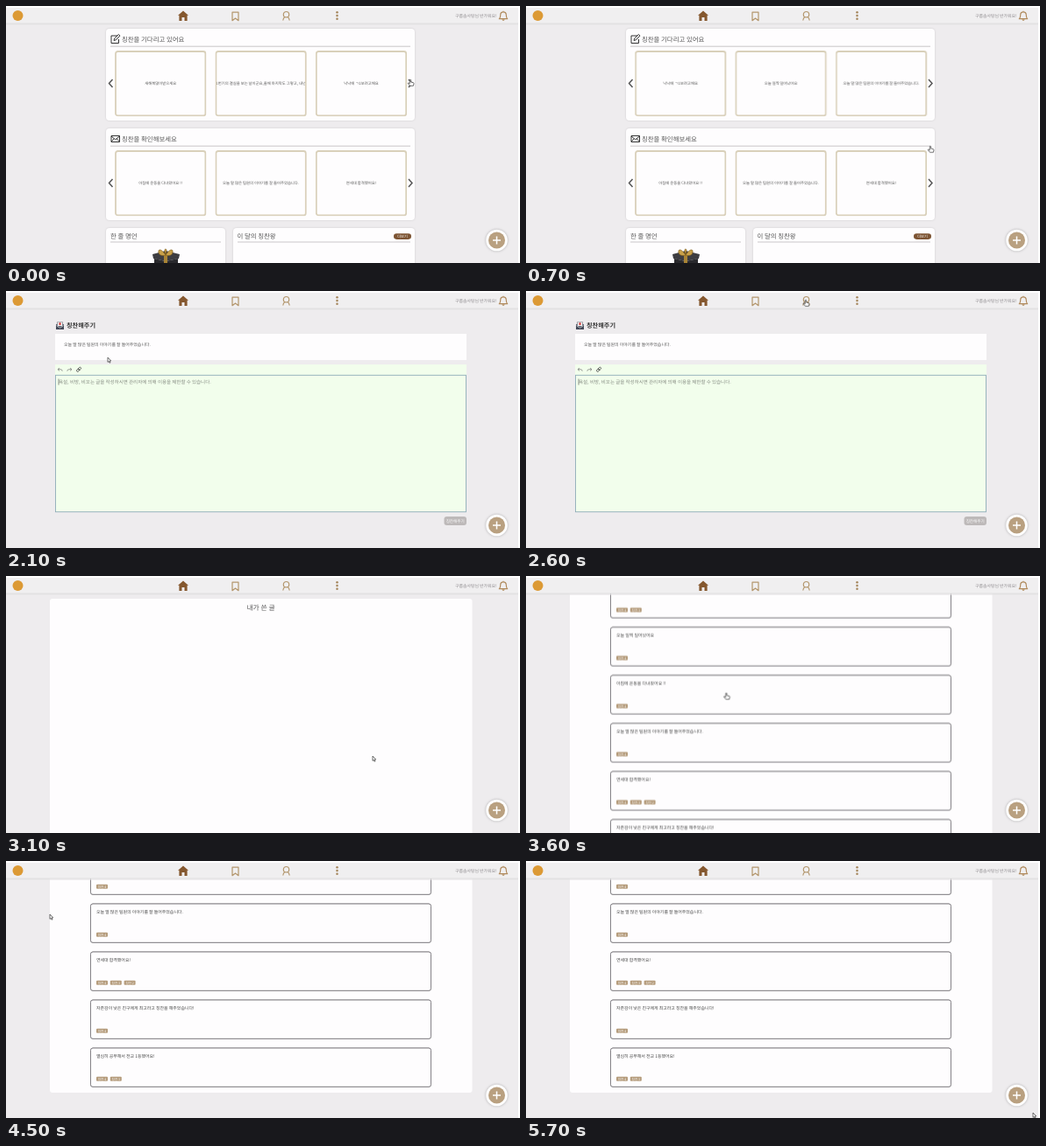
Animation of 586 by 294 pixels, one loop 5.8 s. Source, as an HTML page:

```html
<!DOCTYPE html>
<html>
<head>
<meta charset="utf-8">
<title>칭찬</title>
<style>
html, body { margin: 0; width: 100%; height: 100%; overflow: hidden; background: #fff; }
#stage { display: block; }
text { font-family: "Noto Sans CJK KR", "Noto Sans CJK", sans-serif; fill: #555; text-rendering: geometricPrecision; }
.panel { fill: #fefdfe; filter: drop-shadow(0 .5px 1px #0002); }
.line { stroke: #bbb8ba; stroke-width: .8; }
.tan { fill: none; stroke: #b3966c; stroke-width: 1.2; stroke-linejoin: round; }
.dark { fill: none; stroke: #333; stroke-width: 1; stroke-linejoin: round; }
.arrow { fill: none; stroke: #555; stroke-width: 1.5; }
.card { fill: none; stroke: #d9d0ba; stroke-width: 1.8; }
.post { fill: #fefdfe; stroke: #858287; stroke-width: 1; filter: drop-shadow(.4px .8px .7px #0006); }
.pointer { fill: #fff; stroke: #333; stroke-width: .7; stroke-linejoin: round; }

.scene, .shape, .hover, .track, #posts, #scroll, #cursor { animation: 5800ms linear infinite; }
.scene, .shape, .hover { animation-timing-function: step-end; }
#home { animation-name: home; }
#write { animation-name: write; }
#list { animation-name: list; }
#first { animation-name: first; }
#second { animation-name: second; }
.hover { animation-name: hover; }
#posts { animation-name: load; }
#scroll { animation-name: scroll; animation-timing-function: ease-in-out; }
#cursor { animation-name: move; animation-timing-function: ease-in-out; }
#hand { animation-name: hand; }
#tip { animation-name: tip; }

@keyframes home { 0% { opacity: 1 } 27.6%, 100% { opacity: 0 } }
@keyframes write { 0% { opacity: 0 } 27.6% { opacity: 1 } 48.2%, 100% { opacity: 0 } }
@keyframes list { 0% { opacity: 0 } 48.2%, 100% { opacity: 1 } }
@keyframes first {
  0%, 2.6% { transform: none }
  6%, 7.8% { transform: translateX(-114.4px) }
  11.2%, 100% { transform: translateX(-228.8px) }
}
@keyframes second {
  0%, 14% { transform: none }
  16.6%, 17.4% { transform: translateX(-114.4px) }
  20.5%, 100% { transform: translateX(-228.8px) }
}
@keyframes hover { 0% { stroke: #d9d0ba } 21% { stroke: #a58d6e } 27.6%, 100% { stroke: #d9d0ba } }
@keyframes load { 0%, 53.5% { opacity: 0 } 56%, 100% { opacity: 1 } }
@keyframes scroll {
  0%, 57.5% { transform: none }
  67%, 69% { transform: translateY(-220px) }
  70.5%, 100% { transform: translateY(-223px) }
}
@keyframes move {
  0%, 10% { transform: translate(461px, 84px) }
  13.5%, 17.5% { transform: translate(461px, 199px) }
  21.8%, 27.6% { transform: translate(408px, 96px) }
  34.5%, 37.5% { transform: translate(116px, 76px) }
  45%, 48.2% { transform: translate(319px, 10px) }
  53.2%, 56% { transform: translate(418px, 206px) }
  64%, 69% { transform: translate(203px, 124px) }
  76%, 84% { transform: translate(50px, 61px) }
  92%, 100% { transform: translate(578px, 288px) }
}
@keyframes hand {
  0% { opacity: 1 } 28% { opacity: 0 } 44% { opacity: 1 } 48.3% { opacity: 0 }
  61% { opacity: 1 } 72% { opacity: 0 } 100% { opacity: 0 }
}
@keyframes tip {
  0% { opacity: 0 } 28% { opacity: 1 } 44% { opacity: 0 } 48.3% { opacity: 1 }
  61% { opacity: 0 } 72% { opacity: 1 } 100% { opacity: 1 }
}
</style>
</head>
<body>
<svg id="stage" width="586" height="294"></svg>
<script>
const talk = '오늘 말 많은 팀원의 이야기를 잘 들어주었습니다.';
const exam = '연세대 합격했어요!';
const friend = '자존감이 낮은 친구에게 최고라고 칭찬을 해주었습니다!';
const study = '열심히 공부해서 전교 1등했어요!';
const early = '오늘 일찍 일어났어요';
const run = '아침에 운동을 다녀왔어요 !!';
const waiting = ['새해복많이받으세요', '1번기의 결실을 보는 날이군요,올해 마지막도 그렇고, 내년',
  '낙낙에 ㄱ1보려고해요', early, talk];
const received = [run, talk, exam, friend, study];
const posts = [[waiting[0], 1], [waiting[2], 2], [early, 1], [run, 1], [talk, 1], [exam, 3], [friend, 1], [study, 2]];

const rect = (x, y, w, h, r, attrs = '') =>
  `<rect x="${x}" y="${y}" width="${w}" height="${h}" rx="${r}" ${attrs}/>`;
const path = (d, attrs) => `<path d="${d}" ${attrs}/>`;
const text = (x, y, size, str, attrs = '') =>
  `<text x="${x}" y="${y}" font-size="${size}" ${attrs}>${str}</text>`;
const mid = 'text-anchor="middle"';
const white = mid + ' style="fill:#fff"';
const rule = (x1, x2, y) => path(`M${x1} ${y}H${x2}`, 'class="line"');

function slide(str, i, hovered) {
  return `<svg x="${1 + i * 114.4}" y="1" width="104.5" height="75.5">
    ${text(52.2, 38.6, 4.35, str, mid)}
    ${rect(1, 1, 102.4, 73.4, 2.5, `class="card ${hovered ? 'hover' : ''}"`)}</svg>`;
}

function carousel(y, id, title, items, icon, hovered) {
  return rect(114, y, 352, 105, 4, 'class="panel"') + icon
    + text(132, y + 14.6, 7.4, title) + rule(119, 461, y + 20.2)
    + `<svg x="123" y="${y + 24}" width="336" height="78"><g id="${id}" class="track">`
    + items.map((s, i) => slide(s, i, i === hovered)).join('') + '</g></svg>'
    + path(`M121.5 ${y + 58}l-4 4.5 4 4.5M459 ${y + 58}l4 4.5-4 4.5`, 'class="arrow"');
}

const editIcon = path('M127 34H120V42.5H128.5V38M123 39.5l.6-2.4 4.8-4.6 1.6 1.6-4.7 4.7z', 'class="dark"');
const mailIcon = path('M120 148.5H129.5V155.5H120ZM120 149l4.7 3.8 4.8-3.8M120 155l3.4-3.2M129.5 155l-3.4-3.2', 'class="dark"');

const gift = path('M167 284l15-4 16 4-1 5-15 3-14-3z', 'fill="#3d3d41"')
  + path('M169 289l13 3 14-3v5h-27z', 'fill="#29292d"')
  + path('M180 284h4v10h-4z', 'fill="#a98435"')
  + path('M182 285c-5-8-9-7-8-3s5 4 8 3c5-8 9-7 8-3s-5 4-8 3M182 284c-3-6 1-8 1-4z',
    'fill="#c9a14a" stroke="#7d5c1c" stroke-width=".7"');

const home = carousel(26, 'first', '칭찬을 기다리고 있어요', waiting, editIcon, 4)
  + carousel(140, 'second', '칭찬을 확인해보세요', received, mailIcon)
  + rect(114, 254, 136, 50, 4, 'class="panel"') + rect(259, 254, 207, 50, 4, 'class="panel"')
  + text(119, 266, 7.4, '한 줄 명언') + rule(119, 245, 270)
  + text(263.5, 266, 7.4, '이 달의 칭찬왕') + rule(264, 461, 270)
  + rect(442, 260.3, 20, 6.6, 3.3, 'fill="#7d5433"') + text(452, 265.2, 4.2, '더보기', white)
  + gift;

const write = path('M57 38.5l4.5-3 4.5 3v5.5h-9z', 'fill="#444a59"')
  + rect(58.5, 35.3, 6, 5, .5, 'fill="#fff" stroke="#444a59" stroke-width=".5"')
  + '<circle cx="61.5" cy="37.6" r="1.5" fill="#d14b4b"/>'
  + path('M57.5 39.5l4 2.8 4-2.8', 'fill="none" stroke="#fff" stroke-width=".6"')
  + text(69, 42.4, 7.2, '칭찬해주기', 'font-weight="600" style="fill:#333"')
  + rect(56, 49, 469, 30, 0, 'fill="#fefdfe"') + text(66, 63, 4.95, talk)
  + rect(56, 84, 469, 12, 0, 'fill="#f2feec"')
  + path('M61 88l-2 1.7 2 1.7M59 89.7h3.2q2 0 2 2', 'fill="none" stroke="#777" stroke-width=".7"')
  + path('M73 88l2 1.7-2 1.7M75 89.7h-3.2q-2 0-2 2', 'fill="none" stroke="#777" stroke-width=".7"')
  + `<g transform="rotate(-45 83 89.8)" fill="none" stroke="#444" stroke-width=".8">
    ${rect(80, 88.6, 3.6, 2.4, 1.2)}${rect(82.5, 88.6, 3.6, 2.4, 1.2)}</g>`
  + rect(56.5, 96.3, 468, 156.4, 0, 'fill="#f2feec" stroke="#8fadb8" stroke-width=".9"')
  + text(60, 106, 5.5, '욕설, 비방, 비꼬는 글을 작성하시면 관리자에 의해 이용을 제한할 수 있습니다.', 'style="fill:#858b82"')
  + path('M60 100.5v7', 'stroke="#444" stroke-width=".6"')
  + rect(499.5, 258, 25.5, 10, 3, 'fill="#bdb9b9"') + text(512.2, 264.8, 4.6, '칭찬해주기', white);

function post([str, tags], i) {
  const y = 52 + i * 55;
  let out = rect(96.5, y, 388, 44.3, 2.5, 'class="post"') + text(103, y + 10.7, 4.95, str, 'style="fill:#444"');
  for (let k = 0; k < tags; k++) {
    const x = 103 + k * 15.8;
    out += rect(x, y + 32.8, 13, 5, 1, 'fill="#b59c7c"') + text(x + 6.5, y + 36.7, 3.6, '칭찬 ' + (4 - k), white);
  }
  return out;
}

const list = `<g id="scroll">${rect(50, 26, 481.5, 462, 3, 'fill="#fefdfe"')}
  ${text(290.5, 38.6, 7.8, '내가 쓴 글', mid)}<g id="posts">${posts.map(post).join('')}</g></g>`;

const header = rect(0, 2, 584, 18, 0, 'fill="#f0eff0"')
  + rect(0, 19.6, 584, 1, 0, 'fill="#dbd9db"') + rect(0, 20.6, 584, 1, 0, 'fill="#e6e4e6"')
  + '<circle cx="13.5" cy="11" r="6" fill="#dc9a35"/>'
  + path('M202 5.5l6 5.2h-1.4V17h-3.1v-4h-3v4h-3.1v-6.3H196z', 'fill="#85582f"')
  + path('M258 7.2h7v9.5l-3.5-2.7-3.5 2.7z', 'class="tan"')
  + '<circle cx="319.5" cy="9.7" r="3.2" class="tan"/>'
  + path('M315.8 16.5q.3-3 2.2-4M323.2 16.5q-.3-3-2.2-4', 'class="tan"')
  + [7.2, 11, 14.8].map(y => `<circle cx="377.5" cy="${y}" r="1.25" fill="#a5865c"/>`).join('')
  + text(512, 13, 4.9, '구름솜사탕님 반가워요!', 'style="fill:#8f8c8f"')
  + path('M562.3 14.7q1.4-1 1.4-4.2 0-3.6 3.3-3.6t3.3 3.6q0 3.2 1.4 4.2zM567 6.7v-1M565.8 15.5q1.2 1.6 2.4 0', 'class="tan" style="stroke:#b08a5c"');

const fab = '<circle cx="559.5" cy="268" r="12.3" fill="#fff" style="filter:drop-shadow(0 .5px 1.5px #0004)"/>'
  + '<circle cx="559.5" cy="268" r="9.5" fill="#b9a080"/>'
  + path('M555 268h9M559.5 263.5v9', 'stroke="#fff" stroke-width="1.5"');

const cursor = `<g id="cursor">
  <g id="hand" class="shape">${path('M-.7.5Q0-.4.7.5V3l2.7.7q.8.3.6 1.2L3.4 7.3H-.5L-2.6 4.7q-.3-1 .7-.7l1.2.8z', 'class="pointer"')}</g>
  <g id="tip" class="shape">${path('M0 0V5.4L1.2 4.3 2.1 6.2 3 5.8 2.2 3.9H3.7Z', 'class="pointer"')}</g></g>`;

const scene = (id, body) => `<g id="${id}" class="scene">${body}</g>`;
document.getElementById('stage').innerHTML = rect(0, 2, 584, 292, 0, 'fill="#eeecee"')
  + scene('home', home) + scene('write', write) + scene('list', list)
  + header + rect(0, 0, 586, 2, 0, 'fill="#fff"') + rect(584, 0, 2, 294, 0, 'fill="#fff"')
  + fab + cursor;
</script>
</body>
</html>
```
